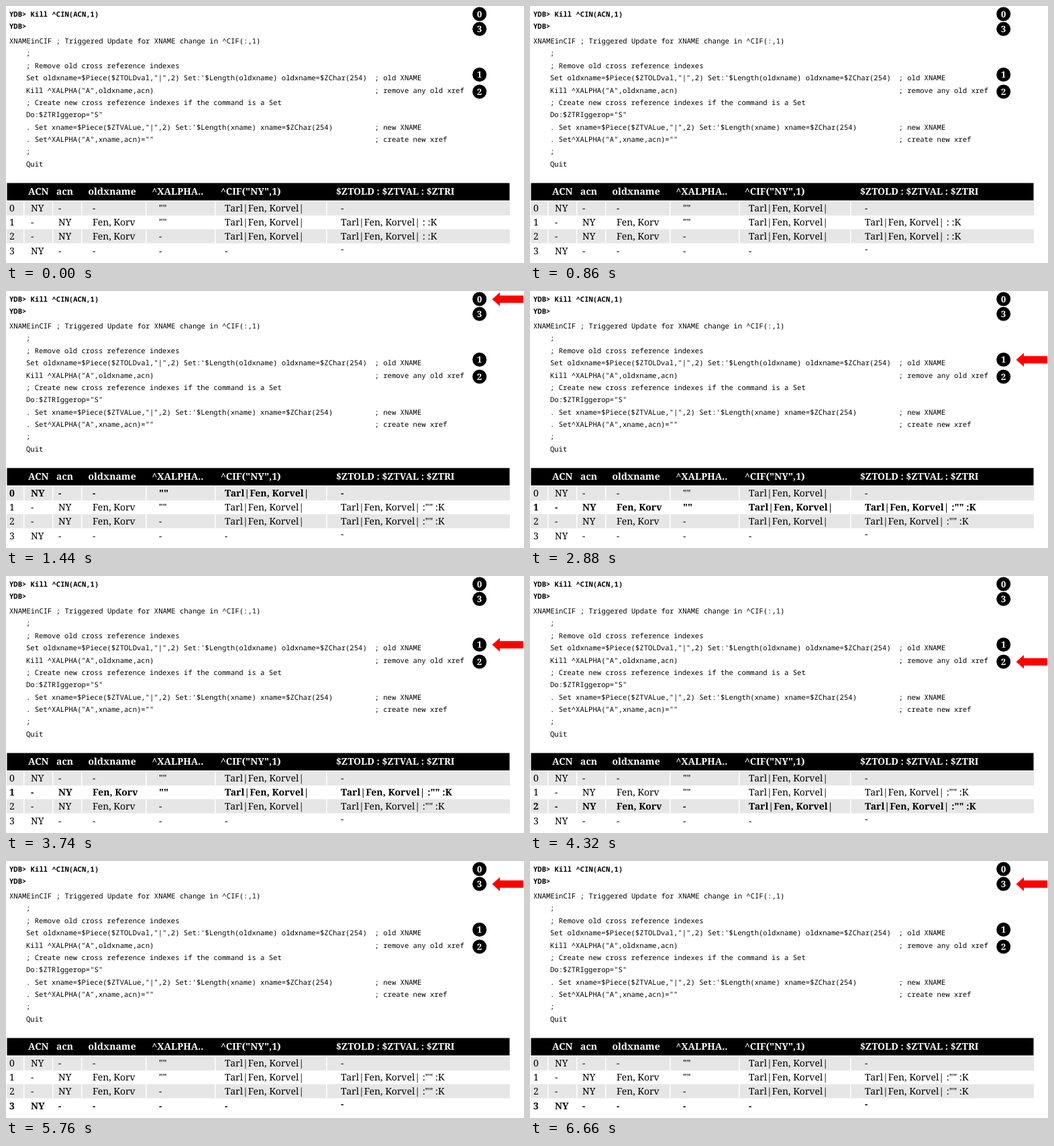
These frames come from a looping animation (772x384 px, 7.26 s). An HTML page:

```html
<!DOCTYPE html>
<html lang="en">
<head>
<meta charset="utf-8">
<title>Trigger walkthrough</title>
<style>
  html, body { margin: 0; width: 100%; height: 100%; overflow: hidden; background: #fff; }
  svg { display: block; }
  text { white-space: pre; text-rendering: geometricPrecision; }
  .code { font: 10.58px "Noto Sans Mono", monospace; }
  .table { font: 14px "Noto Serif", serif; }
  .marker { font: 700 13px "Noto Serif", serif; fill: #fff; text-anchor: middle; }
  .bold { font-weight: 700; }
</style>
</head>
<body>
<svg width="772" height="384" viewBox="0 0 772 384"></svg>
<script>
const LOOP = 7260, STEP = 1440;
const svg = document.querySelector('svg');

function add(tag, attrs, content = '', parent = svg) {
  const el = document.createElementNS('http://www.w3.org/2000/svg', tag);
  for (const key in attrs) el.setAttribute(key, attrs[key]);
  el.textContent = content;
  return parent.appendChild(el);
}
const rect = (x, y, width, height, fill) => add('rect', { x, y, width, height, fill });
const text = (x, y, content, cls, parent) => add('text', { x, y, class: cls }, content, parent);

// Code listing
text(5, 16, 'YDB> Kill ^CIN(ACN,1)', 'code bold');
text(5, 34, 'YDB>', 'code bold');
[
  ['XNAMEinCIF ; Triggered Update for XNAME change in ^CIF(:,1)'],
  [';'],
  ['; Remove old cross reference indexes'],
  ['Set oldxname=$Piece($ZTOLDval,"|",2) Set:\'$Length(oldxname) oldxname=$ZChar(254)', '; old XNAME'],
  ['Kill ^XALPHA("A",oldxname,acn)', '; remove any old xref'],
  ['; Create new cross reference indexes if the command is a Set'],
  ['Do:$ZTRIggerop="S"'],
  ['. Set xname=$Piece($ZTVALue,"|",2) Set:\'$Length(xname) xname=$ZChar(254)', '; new XNAME'],
  ['. Set^XALPHA("A",xname,acn)=""', '; create new xref'],
  [';'],
  ['Quit']
].forEach(([code, note], i) => {
  const y = 56 + 18.38 * i;
  text(i ? 30 : 5, y, code, 'code');
  if (note) text(549.5, y, note, 'code');
});

// Numbered markers, indexed by step
const markerY = [12, 102.5, 128, 34.3];
markerY.forEach((y, i) => {
  add('circle', { cx: 705.7, cy: y, r: 10.5 });
  text(705.7, y + 4.7, i, 'marker');
});
const arrow = add('path', { d: 'M724.5 .3L736 -10V-5.2H771V5.8H736V10.6Z', fill: '#f00' });

// Table
rect(1.5, 264.5, 749, 26, '#000');
for (const y of [292, 333.5]) {
  rect(1, y, 750, 21, '#e6e6e6');
  for (const x of [26, 69, 112, 208, 311, 477]) rect(x, y, 1.5, 21, '#fff');
}
const heads = ['ACN', 'acn', 'oldxname', '^XALPHA..', '^CIF("NY",1)', '$ZTOLD : $ZTVAL : $ZTRI'];
const headX = [33, 75, 122.5, 217.5, 320, 492];
heads.forEach((head, i) => text(headX[i], 282, head, 'table bold').setAttribute('fill', '#fff'));

const cellX = [5, 37, 78, 129, 228, 326, 499];
const record = 'Tarl|Fen, Korvel|', short = 'Fen, Korv';
const rows = [
  ['0', 'NY', '-', '-', '""', record, '-'],
  ['1', '-', 'NY', short, '""', record, ''],
  ['2', '-', 'NY', short, '-', record, ''],
  ['3', 'NY', '-', '-', '-', '-', '-']
].map((cells, r) => {
  const row = add('g', { class: 'table' });
  const y = [306.7, 328, 349, 371][r];
  cells.forEach((cell, c) => text(cellX[c], r === 3 && c === 6 ? y - 3 : y, cell, '', row));
  return row;
});

let shown = -1;
function draw(now) {
  const step = Math.min(4, Math.floor(now % LOOP / STEP));
  if (step !== shown) {
    shown = step;
    const active = step - 1;
    arrow.setAttribute('visibility', step ? 'visible' : 'hidden');
    if (step) arrow.setAttribute('transform', `translate(0 ${markerY[active]})`);
    rows.forEach((row, i) => row.classList.toggle('bold', i === active));
    for (const i of [1, 2]) rows[i].lastChild.textContent = record + (step ? ' :"" :K' : ' : :K');
  }
  requestAnimationFrame(draw);
}
draw(performance.now());
</script>
</body>
</html>
```
